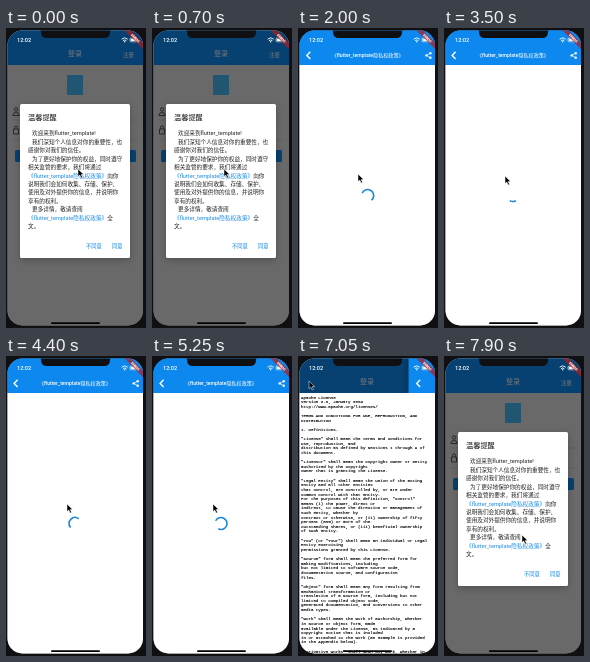
Animation of 140x300 px, one loop 8000 ms. Source, as an HTML page:

```html
<!DOCTYPE html>
<html lang="zh-CN">
<head>
<meta charset="utf-8">
<title>温馨提醒</title>
<style>
html, body { margin: 0; width: 100%; height: 100%; overflow: hidden; background: #101012; }
svg { display: block; width: 140px; height: 300px; }
text { font-family: Roboto, "Noto Sans CJK SC", "Noto Sans CJK", sans-serif; white-space: pre; }
.card { fill: #fff; filter: drop-shadow(0 2px 3px rgba(0, 0, 0, .25)); }
.copy text { font-size: 5.65px; fill: #222; }
.copy tspan { fill: #1a8be6; }
.license text { font: 4.13px "Liberation Mono", "DejaVu Sans Mono", monospace; fill: #000; stroke: #000; stroke-width: .14px; }
</style>
</head>
<body>
<svg viewBox="0 0 140 300">
  <defs>
    <clipPath id="screen"><rect x="1.5" y="2.5" width="135.5" height="295" rx="15"/></clipPath>
    <linearGradient id="shade"><stop offset="0" stop-opacity="0"/><stop offset="1" stop-opacity=".2"/></linearGradient>
  </defs>
  <rect width="140" height="300" fill="#101012"/>
  <g clip-path="url(#screen)">
    <!-- login page -->
    <rect width="140" height="300" fill="#dcdcdc"/>
    <rect width="140" height="37" fill="#0d88ee"/>
    <text x="69" y="28" font-size="7" font-weight="500" fill="#fff" text-anchor="middle">登录</text>
    <text x="117" y="29.2" font-size="5.4" fill="#fff">注册</text>
    <rect x="61" y="47" width="16" height="20" fill="#45b4f2"/>
    <g fill="none" stroke="#555" stroke-width="1">
      <circle cx="10" cy="81.5" r="1.7"/>
      <path d="M6.8 87.5a3.2 3 0 0 1 6.4 0z"/>
      <path d="M6 92h127M6 112h127" stroke="#bbb" stroke-width=".5"/>
      <path d="M7.5 101h5v5h-5zM8.5 101v-1.6a1.5 1.5 0 0 1 3 0v1.6"/>
    </g>
    <rect x="9" y="122" width="121" height="12" rx="1.5" fill="#0d88ee"/>
    <rect width="140" height="300" fill="#000" opacity=".52"/>

    <!-- dialog -->
    <rect class="card" x="14" y="76" width="110" height="154" rx="1.6"/>
    <text x="22" y="92" font-size="7.2" font-weight="500" fill="#111">温馨提醒</text>
    <g class="copy" id="copy"></g>
    <g font-size="5.3" font-weight="500" fill="#0d83e0">
      <text x="80" y="220">不同意</text>
      <text x="106" y="220">同意</text>
    </g>

    <!-- policy page -->
    <g id="body">
      <rect y="37" width="140" height="263" fill="#fff"/>
      <circle id="ring" cx="69" cy="167.5" r="6" pathLength="360" fill="none" stroke="#1a86d8" stroke-width="1.6"/>
      <g class="license" id="license"></g>
    </g>
    <g id="bar">
      <rect x="-7" width="7" height="37" fill="url(#shade)"/>
      <rect width="140" height="37" fill="#0d88ee"/>
      <path d="M11.6 23.7l-3.5 3.7 3.5 3.7" fill="none" stroke="#fff" stroke-width="1.4"/>
      <text x="69" y="29.2" font-size="5.1" font-weight="500" fill="#fff" text-anchor="middle">《flutter_template隐私权政策》</text>
      <path d="M131.7 25.2l-4 2.2 4 2.3" fill="none" stroke="#fff" stroke-width=".7"/>
      <g fill="#fff"><circle cx="131.7" cy="25.2" r="1.2"/><circle cx="127.7" cy="27.4" r="1.2"/><circle cx="131.7" cy="29.7" r="1.2"/></g>
    </g>

    <!-- status bar -->
    <text x="11" y="14" font-size="5.6" font-weight="500" fill="#fff">12:02</text>
    <g fill="none" stroke="#fff" stroke-width=".9">
      <path d="M115.7 11.2a4.4 4.4 0 0 1 6 0M117 12.7a2.6 2.6 0 0 1 3.4 0"/>
      <rect x="124" y="10" width="7.2" height="3.8" rx="1" stroke-width=".6"/>
    </g>
    <circle cx="118.7" cy="13.7" r=".7" fill="#fff"/>
    <rect x="124.8" y="10.8" width="5.6" height="2.2" fill="#fff"/>
    <g transform="translate(137 2.5) rotate(45)">
      <rect x="-15" y="8.6" width="30" height="4.4" fill="#b71c1c" opacity=".7"/>
      <text y="12" font-size="3.4" font-weight="900" fill="#fff" text-anchor="middle">DEBUG</text>
    </g>
    <path d="M32 0q3 2 3 4 0 6 6 6h57q6 0 6-6 0-2 3-4z" fill="#101012"/>
    <rect x="45" y="294.2" width="49" height="1.8" rx=".9" fill="#000"/>
  </g>
  <path id="cursor" d="M0 0v7.6l1.8-1.6 1.3 3 1.4-.6-1.3-2.9h2.4z" fill="#000" stroke="#fff" stroke-width=".5"/>
</svg>
<script>
const $ = id => document.getElementById(id);
const LOOP = 8000, WIDTH = 137;
const PUSH = 1640, LOADED = 5400, POP = 6907, SLIDE = 400, LAG = 150;

const copy = [
  [26, "欢迎来到flutter_template!"],
  [26, "我们深知个人信息对你的重要性，也"],
  [22, "感谢你对我们的信任。"],
  [26, "为了更好地保护你的权益，同时遵守"],
  [22, "相关监管的要求，我们将通过"],
  [22, "<tspan>《flutter_template隐私权政策》</tspan>向你"],
  [22, "说明我们会如何收集、存储、保护、"],
  [22, "使用及对外提供你的信息，并说明你"],
  [22, "享有的权利。"],
  [26, "更多详情，敬请查阅"],
  [22, "<tspan>《flutter_template隐私权政策》</tspan>全"],
  [22, "文。"]
];

const license = `Apache License
Version 2.0, January 2004
http://www.apache.org/licenses/

TERMS AND CONDITIONS FOR USE, REPRODUCTION, AND
DISTRIBUTION

1. Definitions.

"License" shall mean the terms and conditions for
use, reproduction, and
distribution as defined by Sections 1 through 9 of
this document.

"Licensor" shall mean the copyright owner or entity
authorized by the copyright
owner that is granting the License.

"Legal Entity" shall mean the union of the acting
entity and all other entities
that control, are controlled by, or are under
common control with that entity.
For the purposes of this definition, "control"
means (i) the power, direct or
indirect, to cause the direction or management of
such entity, whether by
contract or otherwise, or (ii) ownership of fifty
percent (50%) or more of the
outstanding shares, or (iii) beneficial ownership
of such entity.

"You" (or "Your") shall mean an individual or Legal
Entity exercising
permissions granted by this License.

"Source" form shall mean the preferred form for
making modifications, including
but not limited to software source code,
documentation source, and configuration
files.

"Object" form shall mean any form resulting from
mechanical transformation or
translation of a Source form, including but not
limited to compiled object code,
generated documentation, and conversions to other
media types.

"Work" shall mean the work of authorship, whether
in Source or Object form, made
available under the License, as indicated by a
copyright notice that is included
in or attached to the work (an example is provided
in the Appendix below).

"Derivative Works" shall mean any work, whether in`.split("\n");

const line = (x, y, s) => `<text x="${x}" y="${y.toFixed(2)}">${s}</text>`;
$("copy").innerHTML = copy.map(([x, s], i) => line(x, 107.3 + i * 8.45, s)).join("");
$("license").innerHTML = license.map((s, i) => line(3, 42.5 + i * 4.62, s)).join("");

const clamp = v => Math.min(1, Math.max(0, v));

// CSS-style cubic bezier, solved by bisection
function bezier(x1, y1, x2, y2) {
  const at = (a, b, s) => 3 * (1 - s) * (1 - s) * s * a + 3 * (1 - s) * s * s * b + s * s * s;
  return v => {
    const x = clamp(v);
    if (x === 0 || x === 1) return x;
    let lo = 0, hi = 1;
    for (let i = 0; i < 24; i++) {
      const mid = (lo + hi) / 2;
      if (at(x1, x2, mid) < x) lo = mid; else hi = mid;
    }
    return at(y1, y2, lo);
  };
}
const slideIn = bezier(.35, .91, .33, .97);
const slideOut = bezier(.67, .03, .65, .09);
const smooth = bezier(.4, 0, .2, 1);
const glide = bezier(.4, 0, .6, 1);

// [time, x, y] of the pointer tip
const path = [
  [0, 72, 141], [700, 72, 141], [1350, 63, 145], [1550, 63, 145], [1950, 60, 146],
  [2700, 61, 148], [5800, 61, 148], [6000, 58, 141], [6200, 58, 141],
  [6850, 11, 25], [7200, 11, 25], [7850, 78, 179], [LOOP, 78, 179]
];

function pointer(t) {
  const i = path.findIndex(k => k[0] > t);
  const [t0, x0, y0] = path[i - 1], [t1, x1, y1] = path[i];
  const p = glide((t - t0) / (t1 - t0));
  return [x0 + (x1 - x0) * p, y0 + (y1 - y0) * p];
}

function pageShift(t) {
  const shown = t < POP ? slideIn((t - PUSH) / SLIDE) : slideOut(1 - (t - POP) / SLIDE);
  return (1 - shown) * WIDTH;
}

const move = (el, x, y) => el.setAttribute("transform", `translate(${x.toFixed(2)} ${y.toFixed(2)})`);

function place(el, shift) {
  el.style.display = shift > WIDTH - .3 ? "none" : "";
  move(el, shift, 0);
}

function spin(t) {
  const cycle = (t + 250) / 1000, step = Math.floor(cycle), p = cycle - step;
  const head = smooth(p * 2) * 270, tail = smooth(p * 2 - 1) * 270;
  const start = -90 + tail + p * 306 - (step - 1) * 144;
  $("ring").setAttribute("stroke-dasharray", `${Math.max(head - tail, .5)} 360`);
  $("ring").setAttribute("transform", `rotate(${start % 360} 69 167.5)`);
}

function draw(t) {
  const loaded = t >= LOADED;
  place($("bar"), pageShift(t));
  // the web view trails its header on the way out
  place($("body"), pageShift(t < POP ? t : Math.max(POP - 1, t - LAG)));
  $("ring").style.display = loaded ? "none" : "";
  $("license").style.display = loaded ? "" : "none";
  if (!loaded) spin(t);
  move($("cursor"), ...pointer(t));
}

const begin = performance.now();
function tick() {
  draw((performance.now() - begin) % LOOP);
  requestAnimationFrame(tick);
}
tick();
</script>
</body>
</html>
```
